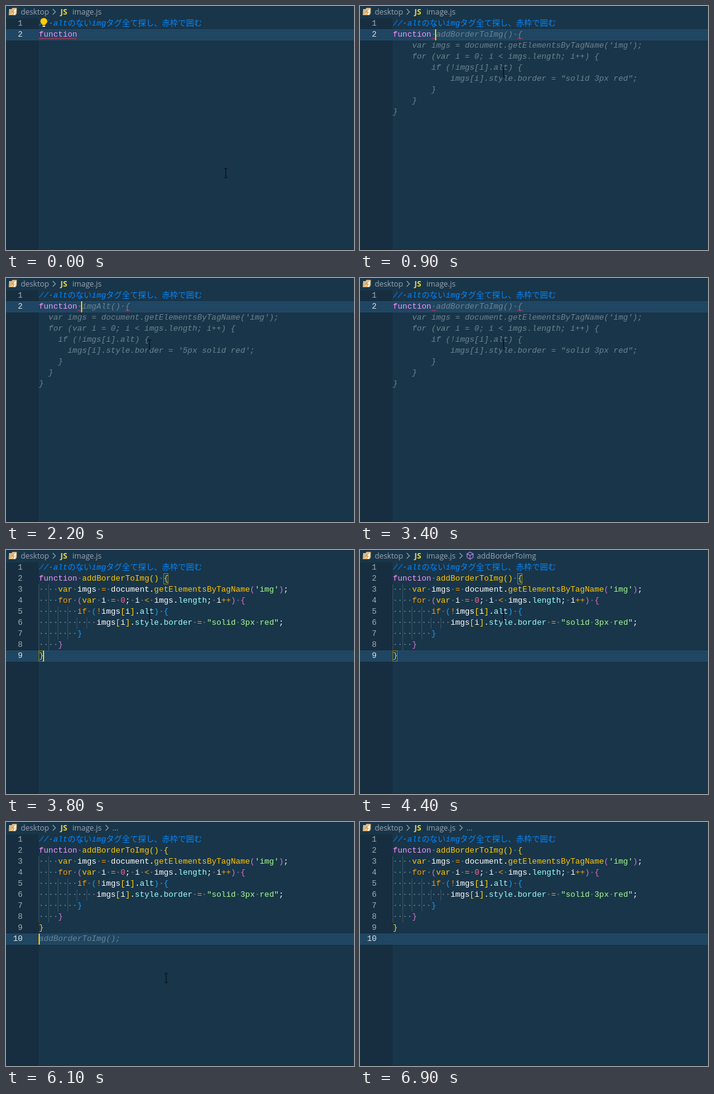
An HTML page for the animation above (7 s loop, 566 by 398 pixels).

```html
<!DOCTYPE html>
<html lang="ja">
<head>
<meta charset="utf-8">
<style>
  html, body { margin: 0; width: 100%; height: 100%; overflow: hidden; background: #193549; }
  svg { display: block; }
  text { white-space: pre; }
  .code { font: 13px "Liberation Mono", monospace; }
  .italic, .ghost { font-style: italic; }
  .ghost { fill: #6d8490; }
  .dots { font-weight: bold; font-style: normal; fill: #5f7c8b; }
  .jp { font-family: "Noto Sans CJK JP", "Noto Sans CJK", sans-serif; font-style: normal; }
  .crumb { font: 12.3px "Open Sans", "Noto Sans", sans-serif; fill: #9aa7b1; }
  .script { font: bold 12.5px "Open Sans", sans-serif; fill: #f0db3c; }
</style>
</head>
<body>
<svg id="stage" width="566" height="398" viewBox="0 0 566 398"></svg>
<script>
const LOOP = 7000, STEP = 100;
const LEFT = 53.5, CHAR = 7.8, TOP = 20, ROW = 18;
const WHITE = '#ffffff', YELLOW = '#ffc600', ORANGE = '#ff9d00', CYAN = '#9effff';
const PINK = '#fb94ff', BLUE = '#0088ff';
const BRACKETS = ['#ffd700', '#da70d6', '#179fff'];
const stage = document.getElementById('stage');

function add(parent, tag, attrs = {}, text = '') {
  const node = document.createElementNS('http://www.w3.org/2000/svg', tag);
  for (const key in attrs) node.setAttribute(key, attrs[key]);
  node.textContent = text;
  parent.appendChild(node);
  return node;
}
const group = () => add(stage, 'g');
const colX = col => LEFT + col * CHAR;
const rowY = line => TOP + (line - 1) * ROW;
const baseY = line => rowY(line) + 12;
const visible = (node, on) => node.setAttribute('visibility', on ? 'visible' : 'hidden');
const within = (t, from, to) => t >= from && t < to;

// Backdrop
add(stage, 'rect', { width: 566, height: 398, fill: '#193549' });
add(stage, 'rect', { y: TOP, width: 53, height: 378, fill: '#162e40' });
const activeRow = add(stage, 'rect', { x: -1, width: 568, height: 17, fill: '#1f4662', stroke: '#234e6d' });
const numbers = Array.from({ length: 10 }, (_, i) =>
  add(stage, 'text', { x: 27, y: baseY(i + 1), class: 'code', 'text-anchor': 'end' }, i + 1));

// Breadcrumbs
function crumb(parent, x, text) {
  return add(parent, 'text', { x, y: 14, class: 'crumb' }, text);
}
function chevron(parent, x) {
  add(parent, 'path', { d: `M${x} 5l4.5 4.5l-4.5 4.5`, fill: 'none', stroke: '#9aa7b1', 'stroke-width': 1.1 });
}
const bar = group();
add(bar, 'path', { d: 'M5 5h4l1.500 -2h7v9l-2 3h-11z', fill: '#dfb67c' });
add(bar, 'path', { d: 'M12 5h5l-2 9h-6z', fill: '#f7f0e2' });
add(bar, 'path', { d: 'M14 5l-4 5h3l-3 5', fill: 'none', stroke: '#c08a3c', 'stroke-width': 1.2 });
crumb(bar, 24, 'desktop');
chevron(bar, 76);
add(bar, 'text', { x: 88.5, y: 14, class: 'script' }, 'JS');
crumb(bar, 108, 'image.js');

const symbolCrumb = group();
chevron(symbolCrumb, 162);
add(symbolCrumb, 'path', {
  d: 'M179 3.500l5 2.500v6l-5 3l-5-3v-6zM174 6l5 3l5-3M179 9v6',
  fill: 'none', stroke: '#b180d7', 'stroke-width': 1.2
});
crumb(symbolCrumb, 190, 'addBorderToImg');
const moreCrumb = group();
chevron(moreCrumb, 162);
crumb(moreCrumb, 173, '...');

// Code
const span = (parent, fill, text, cls = '') => add(parent, 'tspan', { fill, class: cls }, text);
const dots = (parent, count = 1) => add(parent, 'tspan', { class: 'dots' }, '·'.repeat(count));
const codeText = (parent, line, col = 0, cls = '') =>
  add(parent, 'text', { x: colX(col), y: baseY(line), class: 'code ' + cls });

function drawComment() {
  const node = codeText(stage, 1, 0, 'italic');
  span(node, BLUE, '//');
  dots(node);
  span(node, BLUE, 'alt');
  span(node, BLUE, 'のない', 'jp');
  span(node, BLUE, 'img');
  span(node, BLUE, 'タグ全て探し、赤枠で囲む', 'jp');
}

const body = [
  'function addBorderToImg() {',
  "    var imgs = document.getElementsByTagName('img');",
  '    for (var i = 0; i < imgs.length; i++) {',
  '        if (!imgs[i].alt) {',
  '            imgs[i].style.border = "solid 3px red";',
  '        }',
  '    }',
  '}'
];
const rules = [
  [/^['"]|^(solid|3px|red|img)$/, '#a5ff90'],
  [/^function$/, PINK],
  [/^(var|addBorderToImg|getElementsByTagName)$/, YELLOW],
  [/^(for|if|=|<|\+\+|!)$/, ORANGE],
  [/^\d+$/, '#ff628c'],
  [/^(length|alt|style|border)$/, CYAN]
];
let depth = 0;
function tokenColor(token) {
  if (/[([{]/.test(token)) return BRACKETS[depth++ % 3];
  if (/[)\]}]/.test(token)) return BRACKETS[--depth % 3];
  const rule = rules.find(([pattern]) => pattern.test(token));
  return rule ? rule[1] : WHITE;
}
function drawCode(parent) {
  body.forEach((source, i) => {
    const line = i + 2, indent = source.search(/\S/);
    for (let col = 0; col < indent; col += 2)
      add(parent, 'rect', { x: Math.floor(colX(col)), y: rowY(line), width: 1, height: ROW, fill: '#3b5364' });
    const node = codeText(parent, line);
    for (const token of source.match(/\s+|\w+|\+\+|./g))
      /\s/.test(token) ? dots(node, token.length) : span(node, tokenColor(token), token);
  });
}

function squiggle(parent, x, width) {
  let d = `M${x} 54`;
  for (let i = 0; i < width / 2; i++) d += i % 2 ? 'l2 2' : 'l2 -2';
  add(parent, 'path', { d, fill: 'none', stroke: '#d8324a' });
}
function drawGhost(lines) {
  const g = group();
  lines.forEach((source, i) => {
    const indent = source.search(/\S/);
    codeText(g, i + 2, indent + (i ? 0 : 9), 'ghost').textContent = source.trim();
  });
  squiggle(g, colX(8 + lines[0].length), 8);
  return g;
}

const brackets = group();
for (const [line, col] of [[2, 26], [9, 0]])
  add(brackets, 'rect', {
    x: Math.floor(colX(col)) + .5, y: rowY(line) + .5, width: 7, height: 17,
    fill: '#0d3a58', stroke: '#8c7d24'
  });

drawComment();
const draft = group();
span(codeText(draft, 2), PINK, 'function');
const earlySquiggle = group(), lateSquiggle = group();
squiggle(earlySquiggle, 53, 62);
dots(codeText(lateSquiggle, 2, 8));
squiggle(lateSquiggle, 116, 8);

const firstGhost = drawGhost(['addBorderToImg()·{', ...body.slice(1)]);
const secondGhost = drawGhost([
  'imgAlt()·{',
  "  var imgs = document.getElementsByTagName('img');",
  '  for (var i = 0; i < imgs.length; i++) {',
  '    if (!imgs[i].alt) {',
  "      imgs[i].style.border = '5px solid red';",
  '    }',
  '  }',
  '}'
]);
const finished = group();
drawCode(finished);
const callGhost = codeText(stage, 10, 0, 'ghost');
callGhost.textContent = 'addBorderToImg();';

const bulb = group();
add(bulb, 'path', { d: 'M59 31c0-2-3-3-3-6a5.500 5.500 0 0 1 11 0c0 3-3 4-3 6z', fill: '#ffcc00' });
add(bulb, 'path', { d: 'M59.500 32h4v2h-4z', fill: '#e6e6e6' });

const caret = add(stage, 'rect', { width: 2, height: ROW, fill: YELLOW });
const pointer = add(stage, 'path', {
  d: 'M-3 -7.500h2.500l.5 .5l.5-.5h2.500M0 -7v14M-3 7.500h2.500l.5-.5l.5 .5h2.500',
  fill: 'none', stroke: '#06111a', 'stroke-width': 1.2
});

// Motion
function glide(t, from, to, a, b) {
  const p = Math.min(1, Math.max(0, (t - from) / (to - from)));
  const e = p * p * (3 - 2 * p);
  return a.map((v, i) => Math.round(v + (b[i] - v) * e) + .5);
}
function caretOn(t) {
  if (t < 800) return t >= 400;
  return t < 6800 && Math.floor((t - 800) / 500) % 2 === 0;
}

function render(time) {
  const t = Math.floor(time % LOOP / STEP) * STEP;
  const accepted = t >= 3800, newline = t >= 4800;
  const line = newline ? 10 : accepted ? 9 : 2;
  const col = newline ? 0 : accepted ? 1 : t < 800 ? 8 : 9;

  activeRow.setAttribute('y', rowY(line) + .5);
  numbers.forEach((node, i) => {
    visible(node, i < line);
    node.setAttribute('fill', i + 1 === line ? '#e0e4e6' : '#a3acb1');
  });

  visible(symbolCrumb, within(t, 4100, 5100));
  visible(moreCrumb, t >= 5100);
  visible(bulb, t < 800);
  visible(draft, !accepted);
  visible(earlySquiggle, t < 800);
  visible(lateSquiggle, within(t, 800, 3800));
  visible(firstGhost, within(t, 900, 2000) || within(t, 2600, 3800));
  visible(secondGhost, within(t, 2000, 2600));
  visible(finished, accepted);
  visible(brackets, accepted && !newline);
  visible(callGhost, within(t, 5100, 6800));

  visible(caret, caretOn(t));
  caret.setAttribute('x', Math.floor(colX(col)) - (col ? 1 : 0));
  caret.setAttribute('y', rowY(line));

  const [x, y] = t < 5700
    ? glide(t, 0, 500, [357, 272], [233, 108])
    : glide(t, 5700, 6500, [233, 108], [286, 399]);
  pointer.setAttribute('transform', `translate(${x} ${y})`);
  visible(pointer, t < 6600);
}

const start = performance.now();
function tick() {
  render(performance.now() - start);
  requestAnimationFrame(tick);
}
tick();
</script>
</body>
</html>
```
